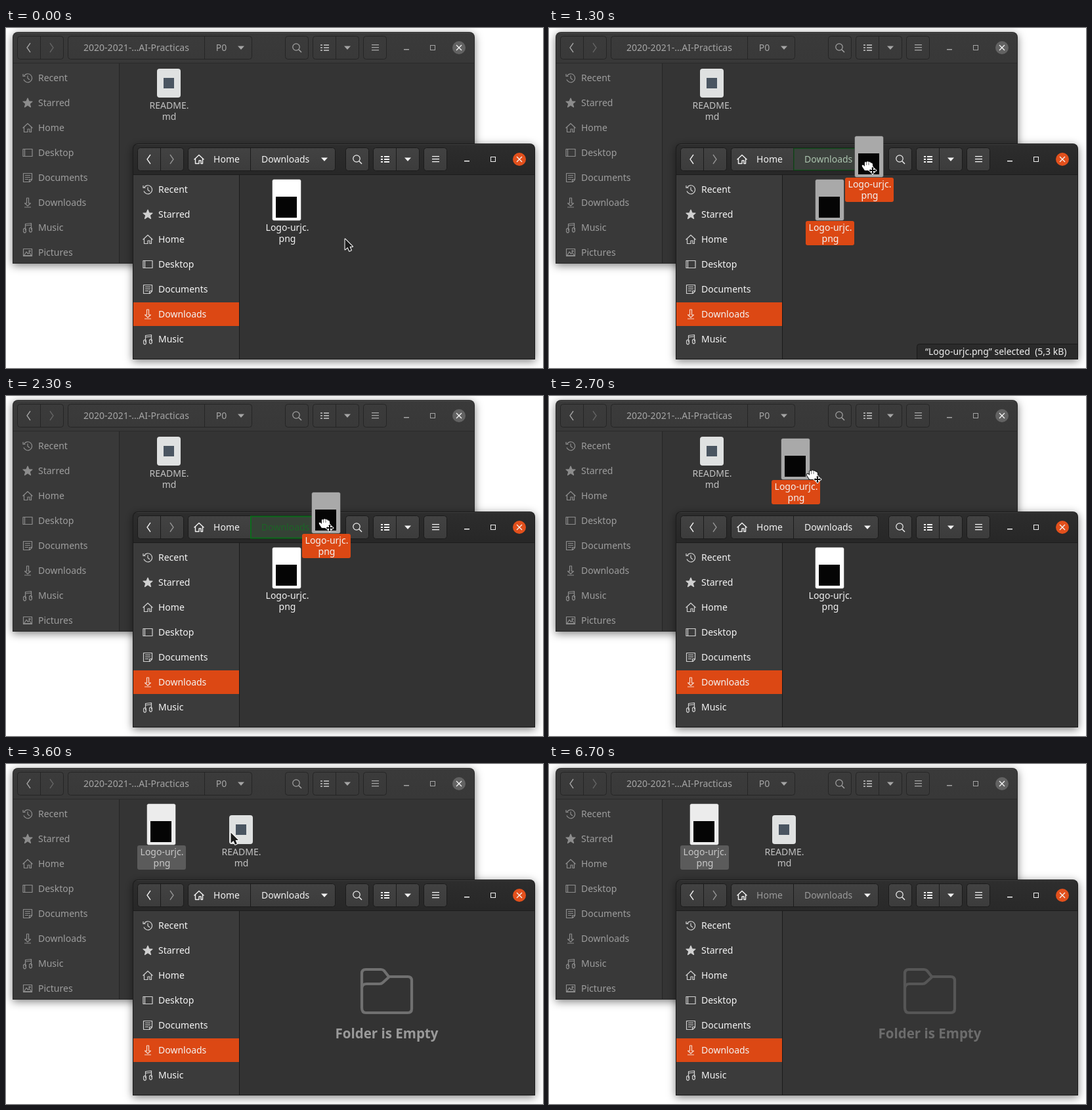
Animation of 818 by 518 pixels, one loop 6800 ms. Source, as an HTML page with a canvas:

```html
<!DOCTYPE html>
<html lang="en">
<head>
<meta charset="utf-8">
<title>Moving a file between folders</title>
<style>
  html, body { margin: 0; width: 100%; height: 100%; overflow: hidden; background: #fff; }
  canvas { display: block; width: 818px; height: 518px; }
</style>
</head>
<body>
<canvas id="stage" width="818" height="518"></canvas>
<script>
const ctx = document.getElementById('stage').getContext('2d');
const LOOP = 6800, TICK = 100;
const FONT = '"Noto Sans", "Open Sans", sans-serif';
const ORANGE = '#dc4814';

// Sidebar glyphs, centred on the origin
const places = [
  ['Recent', 'M-5.5-3A6.5 6.5 0 1 1-6 2.5M-7-6V-2.5H-3.5M0-3.5V.5L3 3'],
  ['Starred', 'M0-7L2-2.2L7-2L3.2 1.4L4.5 6.5L0 3.6L-4.5 6.5L-3.2 1.4L-7-2L-2-2.2Z', true],
  ['Home', 'M-7.5 .5L0-6.5L7.5 .5M-5.5-1V6.5H0V2H3V6.5H5.5V-1'],
  ['Desktop', 'M-7-5.5H7V5.5H-7ZM-4.5-5V5'],
  ['Documents', 'M-6.5-6.5H6.5V3L3 6.5H-6.5ZM-4-3.5H4M-4-.5H4M-4 2.5H1M6 2.5H2.5V6'],
  ['Downloads', 'M-1.5-7H1.5V1H4.5L0 5L-4.5 1H-1.5ZM-5 7H5'],
  ['Music', 'M-3.5 4.5V-5.5L5.5-6.5V3M-3.5-3L5.5-4M-6 4.5a2 2 0 1 0 3 0a2 2 0 1 0-3 0M3 3.5a2 2 0 1 0 3 0a2 2 0 1 0-3 0'],
  ['Pictures', 'M-6.5-5.5H6.5V5.5H-6.5ZM-5.5 4.5L-2-1L.5 2L2.5 0L5.5 4.5ZM2-3H4V-1.5H2Z'],
].map(([name, d, solid]) => ({ name, path: new Path2D(d), solid }));

const homePath = places[2].path;
const folderPath = new Path2D(
  'M-38 25V-27Q-38-33-32-33H-9Q-6-33-4-31L3-22H32Q38-22 38-16V27Q38 33 32 33H-32Q-38 33-38 25Z' +
  'M-38-5Q-37-11-31-11H-11Q-8-11-6-13L4-22');
const arrowPath = new Path2D('M0 0V16L4 12.4L6.5 18.3L9.4 17L7 11.5H11.5Z');
const handPath = new Path2D(
  'M-5 7L-9 1Q-10-2-7-1L-5 1V-5Q-4-7-2.5-5Q-1-8 1-5.5Q3-7 4-4.5Q7-5 7-2V3L5 7Z');
const movePath = new Path2D(
  'M0-5.5L2-3H1V-1H3V-2L5.5 0L3 2V1H1V3H2L0 5.5L-2 3H-1V1H-3V2L-5.5 0L-3-2V-1H-1V-3H-2Z');

// Times in ms; values are linearly joined
const pointerIn = [[200, 516, 321], [300, 511, 319], [400, 496, 311], [500, 475, 299],
  [600, 453, 285], [700, 436, 276], [800, 428, 272]];
const pointerOut = [[4500, 342, 104], [4600, 348, 84], [4700, 358, 48], [4800, 305, 20], [4900, 232, 1]];
// x, y of the dragged icon, then the hand's offset from it
const drag = [[1000, 405, 230, 22, 47], [1100, 416, 216, 22, 47], [1200, 450, 184, 22, 47],
  [1300, 465, 164, 22, 47], [1500, 465, 157, 22, 47], [1800, 465, 157, 22, 47],
  [2100, 465, 154, 22, 47], [2200, 465, 154, 22, 47], [2300, 465, 146, 22, 49],
  [2500, 432, 104, 32, 52], [2700, 353, 64, 50, 57], [2900, 322, 61, 24, 47]];

const clamp = v => Math.max(0, Math.min(1, v));
const ramp = (t, from, to) => clamp((t - from) / (to - from));

function track(keys, t) {
  if (t <= keys[0][0]) return keys[0].slice(1);
  for (let i = 1; i < keys.length; i++) {
    if (t > keys[i][0]) continue;
    const a = keys[i - 1], b = keys[i], p = ramp(t, a[0], b[0]);
    return a.slice(1).map((v, k) => v + (b[k + 1] - v) * p);
  }
  return keys[keys.length - 1].slice(1);
}

function mix(a, b, p) {
  const rgb = c => [1, 3, 5].map(i => parseInt(c.slice(i, i + 2), 16));
  const from = rgb(a), to = rgb(b);
  return `rgb(${from.map((v, i) => Math.round(v + (to[i] - v) * p))})`;
}

function rect(x, y, w, h, color) {
  ctx.fillStyle = color;
  ctx.fillRect(x, y, w, h);
}

function box(x, y, w, h, r, fill, stroke) {
  ctx.beginPath();
  ctx.roundRect(x, y, w, h, r);
  if (fill) { ctx.fillStyle = fill; ctx.fill(); }
  if (stroke) { ctx.strokeStyle = stroke; ctx.lineWidth = 1; ctx.stroke(); }
}

function disc(x, y, r, color) {
  ctx.beginPath();
  ctx.arc(x, y, r, 0, 7);
  ctx.fillStyle = color;
  ctx.fill();
}

function text(s, x, y, color, align = 'left', font = '14px') {
  ctx.font = `${font} ${FONT}`;
  ctx.textAlign = align;
  ctx.fillStyle = color;
  ctx.fillText(s, x, y);
}

function glyph(path, x, y, { fill, stroke, width = 1.2 }) {
  ctx.save();
  ctx.translate(x, y);
  ctx.lineWidth = width;
  ctx.lineJoin = 'round';
  if (stroke) { ctx.strokeStyle = stroke; ctx.stroke(path); }
  if (fill) { ctx.fillStyle = fill; ctx.fill(path); }
  ctx.restore();
}

function line(color, width, ...points) {
  ctx.beginPath();
  points.forEach(([x, y], i) => i ? ctx.lineTo(x, y) : ctx.moveTo(x, y));
  ctx.strokeStyle = color;
  ctx.lineWidth = width;
  ctx.stroke();
}

function button(x, y, widths, look) {
  const total = widths.reduce((a, b) => a + b);
  const fill = ctx.createLinearGradient(0, y, 0, y + 34);
  fill.addColorStop(0, look.button[0]);
  fill.addColorStop(1, look.button[1]);
  box(x - .5, y - .5, total + 1, 35, 4, fill, look.edge);
  let sx = x;
  widths.slice(0, -1).forEach(w => rect(sx += w, y, 1, 34, look.edge));
}

function triangle(x, y, color) {
  ctx.beginPath();
  ctx.moveTo(x - 5, y - 2.5);
  ctx.lineTo(x + 5, y - 2.5);
  ctx.lineTo(x, y + 3);
  ctx.fillStyle = color;
  ctx.fill();
}

const frontLook = {
  header: ['#2d2d2d', '#272727'], button: ['#424242', '#3c3c3c'], edge: '#1b1b1b',
  side: '#3b3b3b', body: '#333333', ink: '#f2f2f2', sideInk: '#f4f4f4', sideIcon: '#d0d0d0',
  frame: '#1c1c1c', close: '#e2501c', dimArrow: '#969696'
};
const wakingLook = { ...frontLook, header: ['#2e2e2e', '#292929'], body: '#353535' };
const backLook = {
  header: ['#3a3a3a', '#383838'], button: ['#3b3b3b', '#393939'], edge: '#252525',
  side: '#393939', body: '#343434', ink: '#a5a5a5', sideInk: '#9d9d9d', sideIcon: '#8c8c8c',
  frame: '#2a2a2a', close: '#626262', dimArrow: '#656565'
};

function windowShell(x, y, w, h, look, rows, rowOffset, selected) {
  ctx.save();
  ctx.shadowColor = 'rgba(0,0,0,.5)';
  ctx.shadowBlur = 13;
  ctx.shadowOffsetY = 3;
  box(x, y, w, h, [8, 8, 0, 0], look.frame);
  ctx.restore();

  ctx.save();
  box(x + 1, y + 1, w - 2, h - 2, [7, 7, 0, 0]);
  ctx.clip();
  const shade = ctx.createLinearGradient(0, y, 0, y + 47);
  shade.addColorStop(0, look.header[0]);
  shade.addColorStop(1, look.header[1]);
  rect(x, y, w, 47, shade);
  rect(x, y + 1, w, 1, 'rgba(255,255,255,.08)');
  rect(x, y + 47, w, 1, look.frame);
  rect(x, y + 48, 162, h, look.side);
  rect(x + 162, y + 48, 1, h, look.edge);
  rect(x + 163, y + 48, w, h, look.body);
  places.slice(0, rows).forEach((place, i) => {
    const cy = y + 70 + 38 * i;
    if (place.name === selected) rect(x, cy - 18, 162, 36, ORANGE);
    const tint = place.name === selected ? '#f5d9ce' : look.sideIcon;
    glyph(place.path, x + 23, cy, { stroke: tint, fill: place.solid && tint });
    text(place.name, x + rowOffset, cy + 5, look.sideInk);
  });
  ctx.restore();
  chrome(x, y, x + w, look);
}

function chrome(x, y, right, look) {
  const cy = y + 24, top = y + 7, ink = look.ink;
  button(x + 8, top, [34, 35], look);
  line(ink, 1.3, [x + 27, cy - 7], [x + 22, cy], [x + 27, cy + 7]);
  line(look.dimArrow, 1.3, [x + 57, cy - 7], [x + 62, cy], [x + 57, cy + 7]);

  button(right - 288, top, [34], look);
  ctx.beginPath();
  ctx.arc(right - 272, cy - 1, 5.2, 0, 7);
  ctx.strokeStyle = ink;
  ctx.lineWidth = 1.2;
  ctx.stroke();
  line(ink, 1.5, [right - 268, cy + 3], [right - 264, cy + 7]);

  button(right - 246, top, [34, 35], look);
  for (const dy of [-5, -1, 3]) {
    rect(right - 235, cy + dy, 3, 2, ink);
    rect(right - 230, cy + dy, 8, 2, ink);
  }
  triangle(right - 194, cy, ink);
  button(right - 169, top, [34], look);
  for (const dy of [-5, -1, 3]) rect(right - 157, cy + dy, 11, 1.3, ink);

  rect(right - 108, cy + 2, 8, 1.5, ink);
  ctx.strokeStyle = ink;
  ctx.lineWidth = 1;
  ctx.strokeRect(right - 67.5, cy - 3.5, 7, 7);
  disc(right - 24, cy, 10, look.close);
  const cx = right - 24;
  line('#f5f5f5', 1.3, [cx - 4, cy - 4], [cx + 4, cy + 4]);
  line('#f5f5f5', 1.3, [cx + 4, cy - 4], [cx - 4, cy + 4]);
}

function imageFile(x, y, { card = '#ffffff', label, ink = '#f2f2f2' } = {}) {
  if (label) box(x - 14, y + 64, 74, 37, 3, label);
  box(x + .5, y + .5, 44, 63, 3, card, 'rgba(0,0,0,.3)');
  rect(x + 6, y + 27, 32, 32, '#050505');
  text('Logo-urjc.', x + 23.5, y + 79, ink, 'center');
  text('png', x + 23.5, y + 96, ink, 'center');
}

function readme(x, y) {
  box(x, y, 36, 44, 4, '#dfe1e1');
  rect(x + 10, y + 14, 16, 16, '#4a5561');
  text('README.', x + 18.5, y + 61, '#c2c2c2', 'center');
  text('md', x + 18.5, y + 78, '#c2c2c2', 'center');
}

function backWindow(dropped) {
  windowShell(10, 6, 704, 353, backLook, 8, 39);
  button(95, 13, [207, 72], backLook);
  text('2020-2021-…AI-Practicas', 198.5, 35, backLook.ink, 'center');
  text('P0', 328, 35, backLook.ink, 'center');
  triangle(358, 30, backLook.ink);
  if (dropped) imageFile(214, 60, { card: '#ececec', label: '#5b5b5b', ink: '#c8c8c8' });
  readme(dropped ? 340 : 230, dropped ? 78 : 62);
}

function emptyFolder(alpha, waking) {
  ctx.save();
  ctx.globalAlpha = alpha;
  glyph(folderPath, 580, 346, { stroke: waking ? '#565656' : '#707070', width: 4.2 });
  text('Folder is Empty', 580, 418, waking ? '#6c6c6c' : '#9a9a9a', 'center', 'bold 20.5px');
  ctx.restore();
}

function frontWindow(t) {
  const waking = t >= 6700;
  const look = waking ? wakingLook : frontLook;
  const ink = waking ? '#9a9a9a' : look.ink;
  const target = ramp(t, 1200, 1500) * (1 - ramp(t, 2300, 2500));
  windowShell(193, 176, 613, 329, look, 7, 39, 'Downloads');
  button(278, 183, [94, 129], look);
  glyph(homePath, 294, 200, { stroke: look.ink, width: 1.4 });
  text('Home', 336, 205, ink, 'center');
  if (target > 0) {
    rect(373, 183, 128, 34, mix('#404040', '#354236', target));
    ctx.strokeStyle = mix('#1b1b1b', '#0d6a1c', Math.min(1, target * 2));
    ctx.lineWidth = 1 + target;
    ctx.strokeRect(373, 183.5, 128, 33);
  }
  text('Downloads', 389, 205, target ? mix('#f2f2f2', '#1c6426', target) : ink);
  triangle(485, 200, look.ink);

  if (t >= 3200) {
    emptyFolder(.2 + .8 * ramp(t, 3200, 3600), waking);
  } else {
    const selected = t >= 900 && t < 1800;
    imageFile(405, 230, selected ? { card: '#a9a9a9', label: ORANGE } : {});
  }
  if (t >= 1000 && t < 1800) {
    box(560.5, 481.5, 245, 23, [4, 0, 0, 0], '#2a2a2a', '#1a1a1a');
    text('“Logo-urjc.png” selected\u00a0 (5,3 kB)', 573, 498, '#f0f0f0');
  }
}

function pointer(t) {
  if (t >= 1100 && t < 3200) {
    const [x, y, dx, dy] = track(drag, t);
    imageFile(x, y, { card: '#a9a9a9', label: ORANGE });
    glyph(handPath, x + dx - 1, y + dy - 1, { stroke: '#161616', fill: '#ffffff', width: 2 });
    line('#555', .8, [x + dx - 3.5, y + dy - 6], [x + dx - 3.5, y + dy - 2]);
    line('#555', .8, [x + dx, y + dy - 6], [x + dx, y + dy - 2]);
    glyph(movePath, x + dx + 6, y + dy + 6, { stroke: '#ffffff', fill: '#111111', width: 2 });
  } else if (t < 5000) {
    const [x, y] = track(t < 1100 ? pointerIn : pointerOut, t);
    glyph(arrowPath, x + .5, y + .5, { stroke: '#ffffff', fill: '#1c1c1c', width: 2 });
  }
}

function draw(t) {
  rect(0, 0, 818, 518, '#ffffff');
  backWindow(t >= 3200);
  frontWindow(t);
  pointer(t);
}

const start = performance.now();
function frame() {
  const t = (performance.now() - start) % LOOP;
  draw(Math.floor(t / TICK) * TICK);
  requestAnimationFrame(frame);
}
frame();
</script>
</body>
</html>
```
